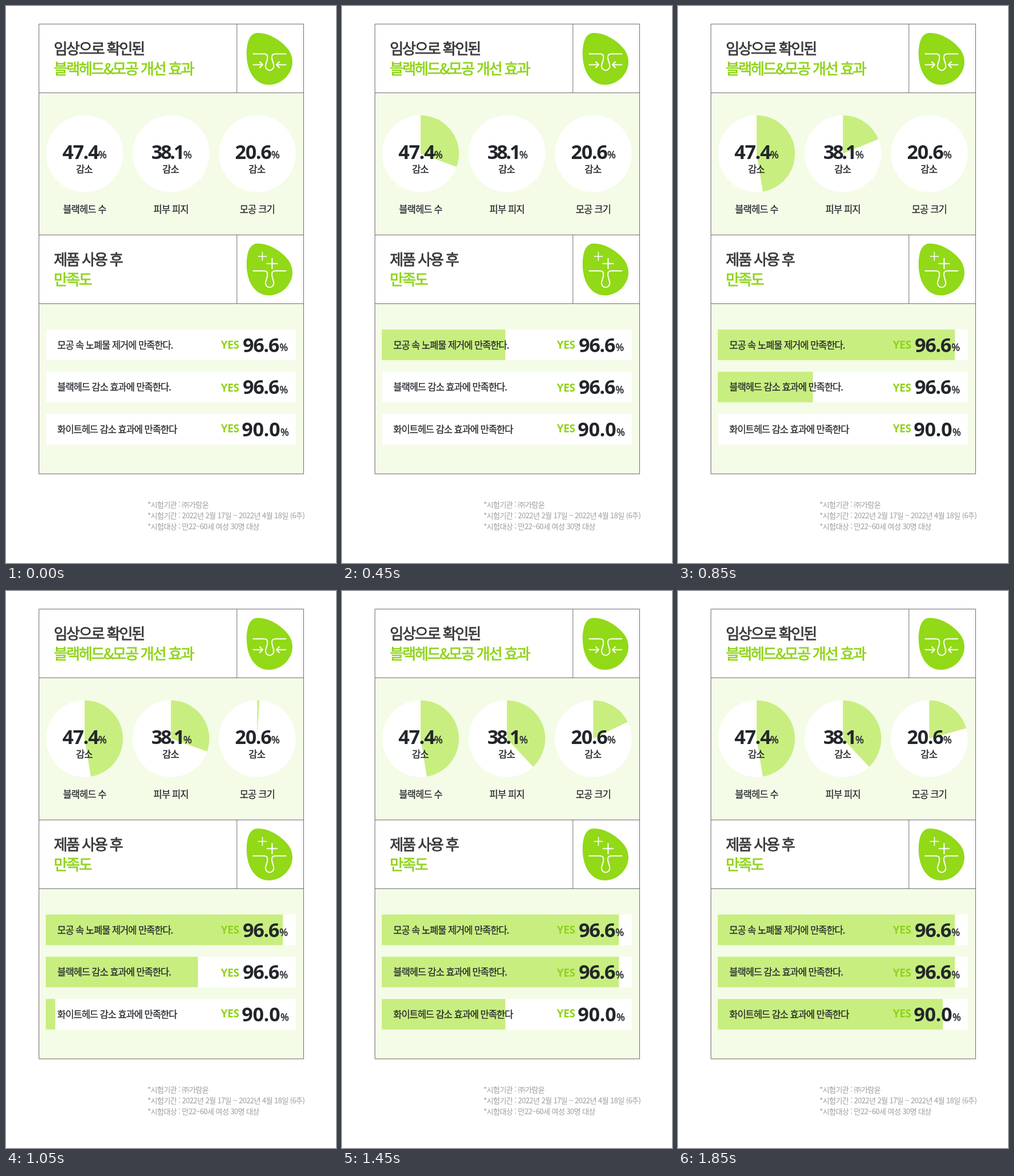
Animation of 576x972 px, one loop 2420 ms. Source, as an HTML page:

```html
<!DOCTYPE html>
<html lang="ko">
<head>
<meta charset="utf-8">
<style>
html, body { margin: 0; width: 100%; height: 100%; overflow: hidden; background: #fff; }
svg { display: block; width: 576px; height: 972px; }
text { font-family: "Noto Sans CJK KR", "Noto Sans CJK", sans-serif; fill: currentColor; stroke: currentColor; stroke-width: 0; color: #22262b; }
.title { font-size: 26px; letter-spacing: -2.15px; stroke-width: .8px; color: #3a3a3a; }
.lime, .yes { color: #8fd41a; }
.body { font-size: 16.5px; letter-spacing: -1.05px; stroke-width: .25px; }
.label { letter-spacing: -.85px; text-anchor: middle; }
.strong { stroke-width: .45px; }
.num, .pct, .yes { font-family: "Noto Sans", "Open Sans", sans-serif; }
.num { font-size: 34px; font-weight: 700; letter-spacing: -1.3px; }
.tight { letter-spacing: -3.3px; }
.wide { letter-spacing: -.3px; }
.pct { font-size: 18px; stroke-width: .35px; }
.yes { font-size: 19px; font-weight: 600; letter-spacing: -.4px; }
.note { font-size: 13px; letter-spacing: -.6px; color: #9c9c9c; }
.icon { fill: none; stroke: #fff; stroke-width: 2; stroke-linecap: round; stroke-linejoin: round; }
.frame { fill: none; stroke: #6e6e6e; }
.fill { fill: #c8ee80; }
</style>
</head>
<body>
<svg id="stage" viewBox="0 0 576 972">
  <defs>
    <path id="blob" fill="#92d918" d="M438 47C458 45.500 482 61 493 76C501.500 88 502 103 496 114C489 128 475 137.500 459 137.500C434 137.500 420 113 420 84C420 61 426 48 438 47Z"/>
    <path id="pore" class="icon" d="M431.500 83.500H450.500Q456.500 83.500 456.500 89.500C456.500 96 453 99 453 105a7.200 7.200 0 0 0 14.400 0C467.400 99 464 96 464 89.500Q464 83.500 470 83.500H488.500"/>
    <path id="spark" class="icon" d="M0-9V9M-9 0H9M-1.500 0L0-1.500L1.500 0L0 1.500Z"/>
  </defs>
  <path fill="#f4fce7" d="M57.500 151.500H519.500V399.500H57.500ZM57.500 519.500H519.500V816H57.500Z"/>
  <path class="frame" d="M57.500 31.500H519.500V816.500H57.500ZM57.500 151.500H519.500M57.500 399.500H519.500M57.500 519.500H519.500M403 31.500V151.500M403 399.500V519.500"/>

  <use href="#blob"/>
  <use href="#pore"/>
  <path class="icon" d="M431.500 102.500H447.500M443 97.500L448 102.500L443 107.500M488.500 102.500H472.500M477 97.500L472 102.500L477 107.500"/>
  <use href="#blob" y="367.500"/>
  <use href="#pore" y="378.800"/>
  <use href="#spark" transform="translate(447.500 437) scale(.8)"/>
  <use href="#spark" transform="translate(464.500 449.500)"/>
</svg>
<script>
const stage = document.getElementById('stage');
const R = 67, CY = 257.7, LEFT = 69.4, STEP = 16.6, BAR_H = 53.4;
const LOOP = 2420, TICK = 50, LAST = 37, STAGGER = 15;

const pies = [
  { cx: 137.2, value: '47.4', style: 'num', x: 98.5, px: 161, label: '블랙헤드 수', steps: 20 },
  { cx: 287.9, value: '38.1', style: 'num tight', x: 253.8, px: 309.5, label: '피부 피지', steps: 20 },
  { cx: 438.5, value: '20.6', style: 'num', x: 399.8, px: 463, label: '모공 크기', steps: 15 }
];
const bars = [
  { y: 564.5, text: '모공 속 노폐물 제거에 만족한다.', value: '96.6', style: 'num', x: 413.3, px: 477.3, yes: 597.5, max: 414 },
  { y: 638.2, text: '블랙헤드 감소 효과에 만족한다.', value: '96.6', style: 'num', x: 413.3, px: 477.3, yes: 672.5, max: 414 },
  { y: 712, text: '화이트헤드 감소 효과에 만족한다', value: '90.0', style: 'num wide', x: 411.5, px: 479, yes: 743.7, max: 392.8 }
];

function add(tag, attrs, content = '') {
  const el = document.createElementNS('http://www.w3.org/2000/svg', tag);
  for (const key in attrs) el.setAttribute(key, attrs[key]);
  el.textContent = content;
  return stage.appendChild(el);
}
const text = (x, y, style, content) => add('text', { x, y, class: style }, content);

text(83.5, 84, 'title', '임상으로 확인된');
text(83.5, 118.5, 'title lime', '블랙헤드&모공 개선 효과');
text(83.5, 452, 'title', '제품 사용 후');
text(83.5, 487, 'title lime', '만족도');

for (const p of pies) {
  add('circle', { cx: p.cx + .2, cy: CY, r: R, fill: '#fff' });
  p.shape = add('path', { class: 'fill' });
  text(p.x, 266.7, p.style, p.value);
  text(p.px, 266, 'pct', '%');
  text(p.cx - .6, 290.5, 'body label strong', '감소');
  text(p.cx, 360.5, 'body label', p.label);
}

for (const b of bars) {
  add('rect', { x: 70, y: b.y, width: 435.7, height: BAR_H, fill: '#fff' });
  b.shape = add('rect', { x: LEFT, y: b.y, width: 0, height: BAR_H, class: 'fill' });
  text(89.5, b.y + 33, 'body', b.text);
  text(375, b.yes, 'yes', 'YES');
  text(b.x, b.y + 39, b.style, b.value);
  text(b.px, b.y + 37.8, 'pct', '%');
}

text(247, 875, 'note', '*시험기관 : ㈜가람윤');
text(247, 893.7, 'note', '*시험기간 : 2022년 2월 17일 ~ 2022년 4월 18일 (6주)');
text(247, 912.5, 'note', '*시험대상 : 만22~60세 여성 30명 대상');

// Sector clockwise from twelve o'clock; the sweep trails by two degrees at the start.
function sector(p, step) {
  const full = p.value * 3.6;
  const angle = Math.min(full, (full + 2) * step / p.steps - 2);
  if (step <= 0 || angle <= 0) return '';
  const a = angle * Math.PI / 180;
  const x = p.cx + R * Math.sin(a), y = CY - R * Math.cos(a);
  return `M${p.cx} ${CY}V${CY - R}A${R} ${R} 0 0 1 ${x} ${y}Z`;
}

// Every third step is skipped: 1, 2, 4, 5, 7, 8 ...
function draw(now) {
  const tick = Math.min(LAST, Math.floor((now % LOOP) / TICK));
  const step = Math.floor(1.5 * tick - .5);
  pies.forEach((p, i) => p.shape.setAttribute('d', sector(p, step - STAGGER * i)));
  bars.forEach((b, i) => {
    const width = STEP * (step - STAGGER * i);
    b.shape.setAttribute('width', Math.max(0, Math.min(b.max, width)));
  });
}

const start = performance.now();
function loop() {
  draw(performance.now() - start);
  requestAnimationFrame(loop);
}
loop();
</script>
</body>
</html>
```
